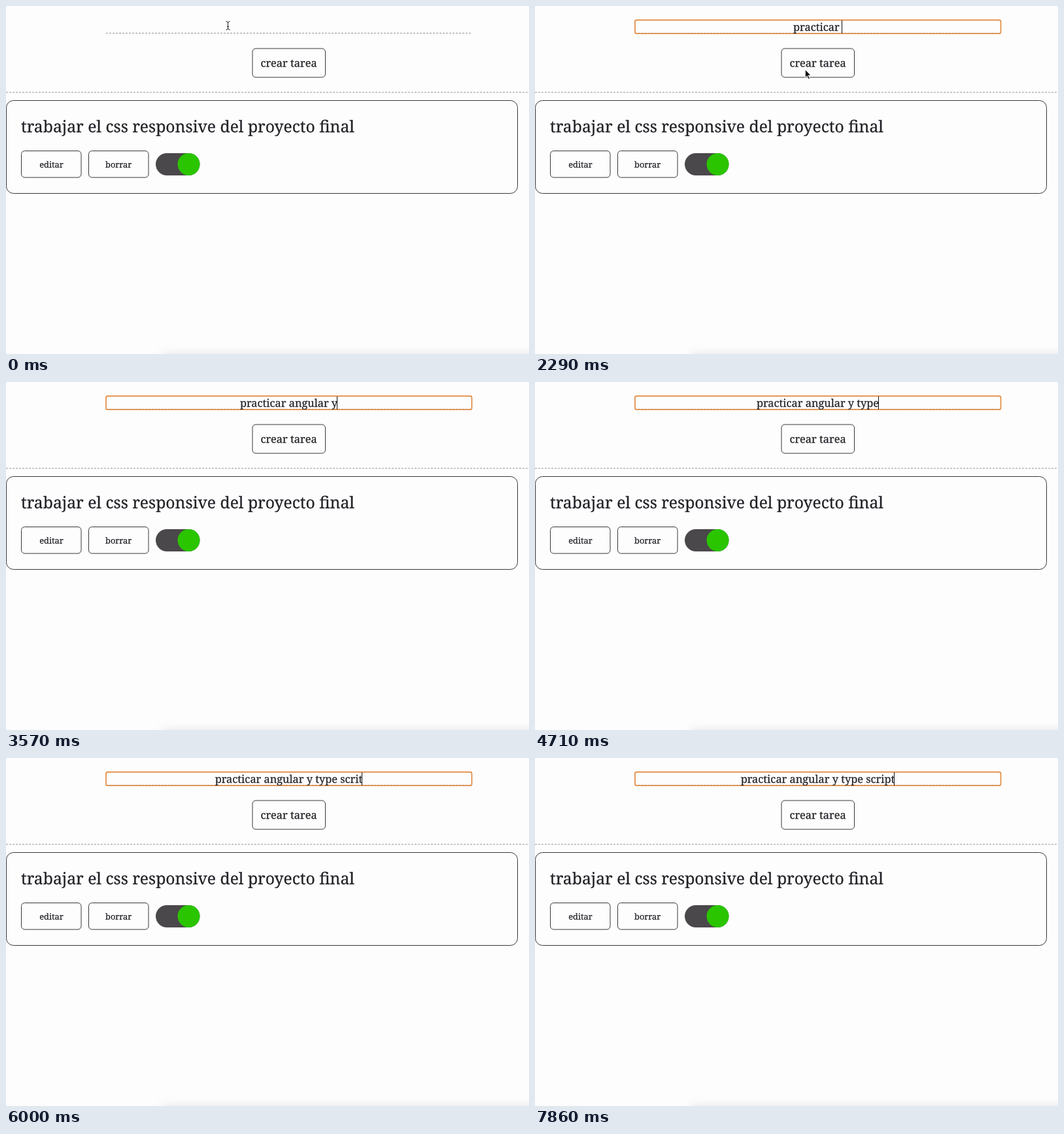
These frames come from a looping animation (800x532 px, 8000 ms). An HTML page:

```html
<!DOCTYPE html>
<html lang="es">
<head>
<meta charset="utf-8">
<style>
  html, body { margin: 0; width: 100%; height: 100%; overflow: hidden; background: #fefdfe; }
  svg { display: block; }
  text {
    font-family: "Noto Serif", Georgia, serif; font-size: 16.35px; white-space: pre;
    fill: #222126; stroke: #222126; stroke-width: .25; text-rendering: geometricPrecision;
  }
  .middle { text-anchor: middle; }
  .small { font-size: 12.8px; }
  .title { font-size: 24.7px; }
  .box { fill: none; stroke: #38363a; }
  .dashed { stroke: #929094; stroke-dasharray: 3 2; }
</style>
</head>
<body>
<svg width="800" height="532" viewBox="0 0 800 532">
  <defs>
    <filter id="blur" x="-20%" y="-200%" width="140%" height="500%"><feGaussianBlur stdDeviation="9"/></filter>
  </defs>
  <rect x="238" y="535" width="600" height="20" fill="#000" opacity=".14" filter="url(#blur)"/>

  <path class="dashed" d="M153 41.5H713"/>
  <rect id="ring" x="153" y="21.5" width="559.5" height="20.7" rx="2.5" fill="none" stroke="#e3914a" stroke-width="1.8"/>
  <text id="entry" class="middle" x="432.5" y="37.7"></text>
  <rect id="caret" y="22" width="1" height="20" fill="#111"/>

  <rect class="box" x="377" y="65" width="111.5" height="44" rx="5"/>
  <text class="middle" x="432.5" y="93.3">crear tarea</text>
  <path class="dashed" d="M0 132H800"/>

  <rect class="box" x=".5" y="144.5" width="782" height="142" rx="11"/>
  <text class="title" x="23" y="192.5">trabajar el css responsive del proyecto final</text>
  <rect class="box" x="23.5" y="221.5" width="91.5" height="40.6" rx="5"/>
  <text class="middle small" x="69.5" y="247.3">editar</text>
  <rect class="box" x="126.5" y="221.5" width="91.5" height="40.6" rx="5"/>
  <text class="middle small" x="172.2" y="247.3">borrar</text>
  <rect x="229" y="225" width="67.5" height="34" rx="17" fill="#4a484a"/>
  <circle cx="279.5" cy="242" r="17" fill="#2bc500"/>

  <path id="beam" d="M336.5 23.5q3 0 3 2.5q0-2.5 3-2.5M339.5 26v8M336.5 36.5q3 0 3-2.5q0 2.5 3 2.5M338 31.5h3" fill="none" stroke="#222"/>
  <path id="arrow" d="M413.3 97v12.5l2.8-2.6 2.2 5 2.1-.9-2.2-4.9h3.8z" fill="#111" stroke="#fff" stroke-width=".9"/>
</svg>
<script>
  const LOOP = 8000, FOCUS = 285, BLINK = 500, CENTER = 432.5;

  // Bursts of evenly spaced keys: first key, last key, keys ("<" is backspace)
  const bursts = [
    [700, 1280, "prac"],
    [1560, 2280, "ticar "],
    [2425, 3280, "angular "],
    [3560, 3700, "y "],
    [3990, 4280, "typ"],
    [4700, 5280, "e s"],
    [5565, 6280, "crit<<"],
    [6565, 6855, "ipt"]
  ];

  const [ring, entry, caret, beam, arrow] =
    ["ring", "entry", "caret", "beam", "arrow"].map(id => document.getElementById(id));
  const show = (el, on) => el.setAttribute("visibility", on ? "visible" : "hidden");

  function typedAt(t) {
    let content = "", lastKey = FOCUS;
    for (const [first, last, keys] of bursts) {
      [...keys].forEach((key, i) => {
        const time = first + (last - first) * i / (keys.length - 1);
        if (time > t) return;
        content = key === "<" ? content.slice(0, -1) : content + key;
        lastKey = time;
      });
    }
    return { content, lastKey };
  }

  function draw(t) {
    const { content, lastKey } = typedAt(t);
    if (entry.textContent !== content) entry.textContent = content;
    const width = content ? entry.getComputedTextLength() : 0;
    caret.setAttribute("x", Math.floor(CENTER + width / 2 - .3));

    show(ring, t >= FOCUS);
    show(caret, t >= FOCUS && (t - lastKey) % (2 * BLINK) < BLINK);
    show(beam, !content);
    show(arrow, t >= 2280 && t < 2425);
  }

  const start = performance.now();
  function frame() {
    draw((performance.now() - start) % LOOP);
    requestAnimationFrame(frame);
  }
  frame();
</script>
</body>
</html>
```
